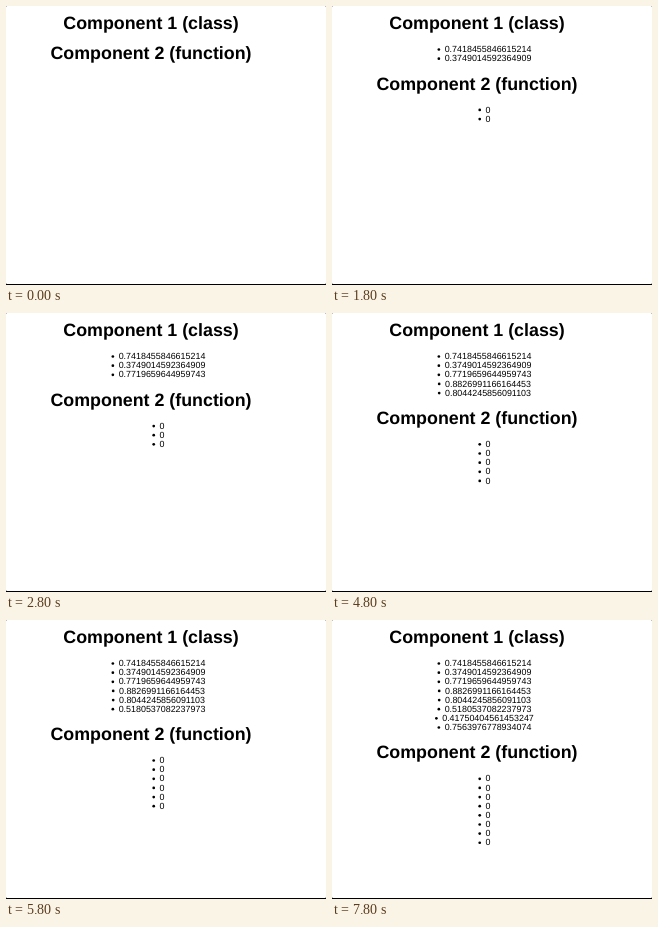
Write an HTML page that moves like this. It is 320 px wide and 279 px high and loops after 7.9 s.

```html
<!DOCTYPE html>
<html lang="en">
<head>
<meta charset="utf-8">
<title>Components</title>
<style>
  html, body { margin: 0; width: 100%; height: 100%; overflow: hidden; background: #000; }
  svg { display: block; width: 100%; height: 100%; }
  text {
    font: 8.92px "Liberation Sans", Arial, sans-serif;
    text-anchor: middle;
    text-rendering: geometricPrecision;
  }
  .heading { font-size: 17.84px; font-weight: bold; }
</style>
</head>
<body>
<svg viewBox="0 0 320 279">
  <rect width="320" height="278" rx="1" fill="#fff"/>
  <g id="content"></g>
</svg>
<script>
  const LOOP = 7900, FIRST = 800, STEP = 1000;
  const CENTER = 145, LIST_CENTER = 156;
  const ROW = 9.14, MARGIN = 11.94, TOP = 23.1, LIST_OFFSET = 23.1;
  const values = [
    "0.7418455846615214", "0.3749014592364909", "0.7719659644959743",
    "0.8826991166164453", "0.8044245856091103", "0.5180537082237973",
    "0.41750404561453247", "0.7563976778934074"
  ];
  const content = document.getElementById("content");

  function add(tag, attributes, label = "") {
    const node = document.createElementNS("http://www.w3.org/2000/svg", tag);
    for (const name in attributes) node.setAttribute(name, attributes[name]);
    node.textContent = label;
    return content.appendChild(node);
  }

  function drawSection(title, y, items) {
    add("text", { class: "heading", x: CENTER, y }, title);
    items.forEach((item, i) => {
      const baseline = y + LIST_OFFSET + i * ROW;
      const label = add("text", { x: LIST_CENTER, y: baseline }, item);
      const left = LIST_CENTER - label.getComputedTextLength() / 2;
      add("circle", { cx: left - 5.8, cy: baseline - 2.7, r: 1.35 });
    });
  }

  function draw(count) {
    content.replaceChildren();
    const items = values.slice(0, count);
    // An empty list collapses into the margin between the headings.
    const gap = count ? 2 * MARGIN + count * ROW : MARGIN;
    drawSection("Component 1 (class)", TOP, items);
    drawSection("Component 2 (function)", TOP + 2 * ROW + gap, items.map(() => "0"));
  }

  let shown = -1;
  function tick() {
    const time = performance.now() % LOOP;
    const count = Math.max(0, Math.floor((time - FIRST) / STEP) + 1);
    if (count !== shown) draw(shown = count);
    requestAnimationFrame(tick);
  }
  tick();
</script>
</body>
</html>
```
